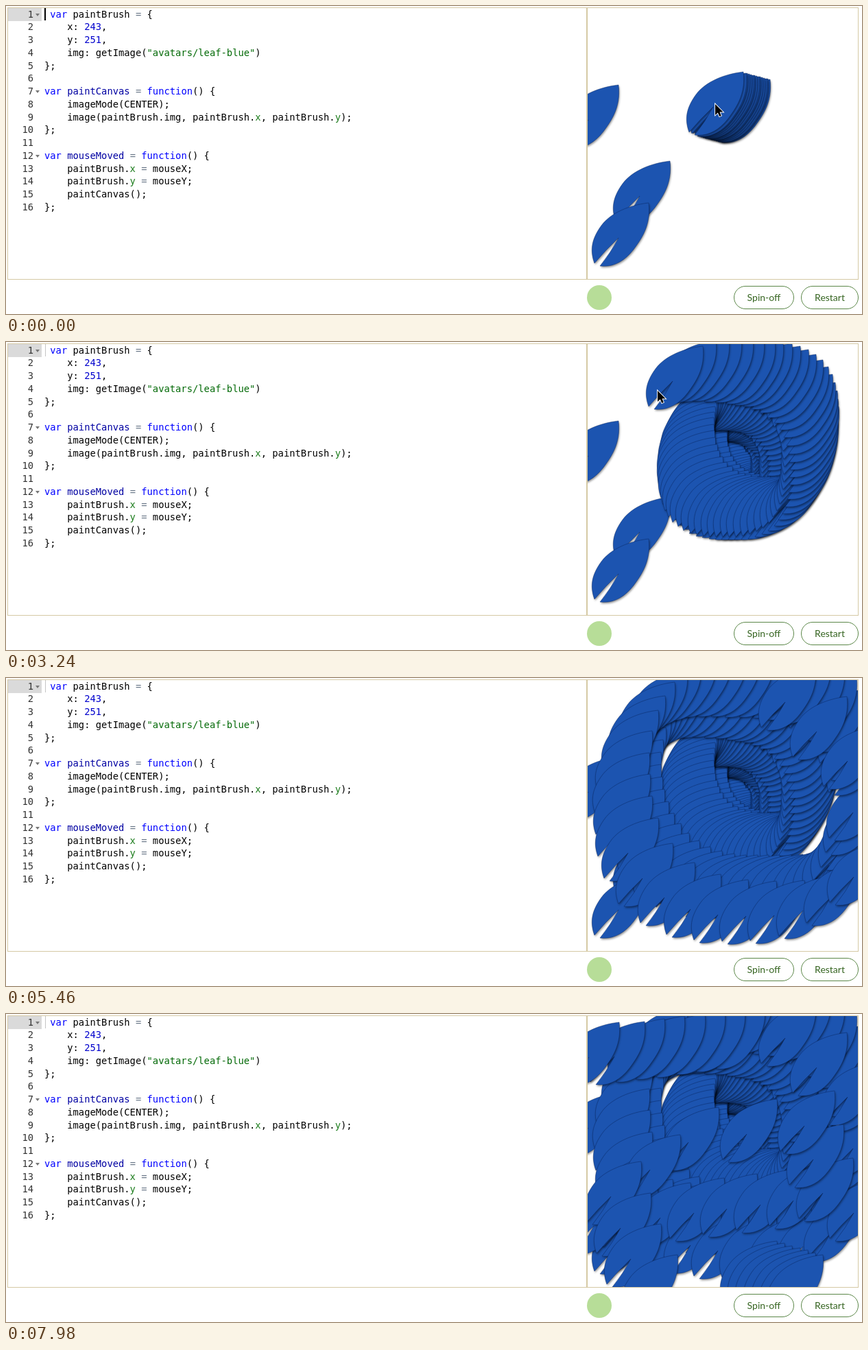
These frames come from a looping animation (1248 px wide and 449 px high, 8580 ms). An HTML page with a canvas:

```html
<!DOCTYPE html>
<html lang="en">
<head>
<meta charset="utf-8">
<title>Leaf painting</title>
<style>
html, body { margin: 0; width: 100%; height: 100%; overflow: hidden; background: #fff; }
#stage { position: relative; width: 1248px; height: 449px; overflow: hidden; }
#stage > * { position: absolute; box-sizing: border-box; }
.panel { top: 2px; height: 397px; border: 1px solid #d5c9a4; }
#editor { left: 2px; width: 845px; }
#output { left: 847px; width: 396px; }
.active { left: 3px; top: 3px; width: 49px; height: 18.5px; background: #dadada; }
pre { margin: 0; top: 2.7px; font: 13.8px/18.73px "DejaVu Sans Mono", monospace; color: #000; }
#numbers { left: 3px; width: 37px; text-align: right; color: #333; }
#code { left: 56px; }
.fold { left: 43px; border: 3px solid transparent; border-top: 4px solid #777; border-bottom: 0; }
#caret { left: 56px; top: 3px; width: 2px; height: 18px; background: #000; }
#caret.dim { left: 57px; width: 1px; background: #c4c4c4; }
.k { color: #00f; }
.d { color: #0000a2; }
.n { color: #0000cd; }
.s { color: #036a07; }
.p { color: #1d7d1d; }
.o { color: #687687; }
.avatar { left: 847px; top: 407px; width: 36px; height: 36px; border-radius: 50%; background: #b7dd98; }
.button { top: 408px; height: 34px; border: 1px solid #5b8748; border-radius: 17px;
  font: 14px/32px Lato, sans-serif; text-align: center; color: #356420; }
#paint { left: 0; top: 0; }
</style>
</head>
<body>
<div id="stage">
  <div class="panel" id="editor"></div>
  <div class="panel" id="output"></div>
  <div class="active"></div>
  <pre id="numbers"></pre>
  <i class="fold" style="top:11px"></i>
  <i class="fold" style="top:123px"></i>
  <i class="fold" style="top:217px"></i>
  <pre id="code"> <span class="k">var</span> paintBrush <span class="o">=</span> {
    x: <span class="n">243</span>,
    y: <span class="n">251</span>,
    img: getImage(<span class="s">"avatars/leaf-blue"</span>)
};

<span class="k">var</span> <span class="d">paintCanvas</span> <span class="o">=</span> <span class="k">function</span>() {
    imageMode(CENTER);
    image(paintBrush.img, paintBrush.<span class="p">x</span>, paintBrush.<span class="p">y</span>);
};

<span class="k">var</span> <span class="d">mouseMoved</span> <span class="o">=</span> <span class="k">function</span>() {
    paintBrush.<span class="p">x</span> <span class="o">=</span> mouseX;
    paintBrush.<span class="p">y</span> <span class="o">=</span> mouseY;
    paintCanvas();
};</pre>
  <div id="caret"></div>
  <div class="avatar"></div>
  <div class="button" style="left:1061px;width:88px">Spin-off</div>
  <div class="button" style="left:1159px;width:84px">Restart</div>
  <canvas id="paint" width="1248" height="449"></canvas>
</div>
<script>
const LOOP = 8580, STEP = 147.6, LAST = 54, SPIRAL_END = 36;
const caret = document.getElementById('caret');
const ctx = document.getElementById('paint').getContext('2d');
document.getElementById('numbers').textContent =
  Array.from({ length: 16 }, (_, i) => i + 1).join('\n');

// Spiral: turns made by a given step, and the radius at every quarter turn from the left.
const pace = [[0, -0.06], [14, 1.87], [22, 2.87], [32, 3.94], [SPIRAL_END, 4.5]];
const radii = [44, 62, 52, 60, 65, 82, 64, 76, 85, 83, 96, 115, 163, 145, 165, 148, 179, 183, 200];

// Hasty strokes after the spiral: [step, x, y].
const strokes = [
  [SPIRAL_END, 1276, 160], [36.8, 1130, 22], [37.3, 1095, -40], [37.5, 1065, 35],
  [39, 890, 58], [40, 780, 60], [42, 860, 305], [44.3, 1195, 262],
  [45, 1167, 159], [46, 998, 183], [47, 885, 262], [48.4, 925, 390],
  [49, 1000, 440], [50, 1083, 378], [53, 1150, 398], [LAST, 1300, 480]
];

// Straight interpolation between keys of the form [time, ...values].
function between(keys, time) {
  const next = Math.max(1, keys.findIndex(key => key[0] >= time));
  const [a, b] = time >= LAST ? keys.slice(-2) : [keys[next - 1], keys[next]];
  const u = Math.min(1, (time - a[0]) / (b[0] - a[0]));
  return a.slice(1).map((v, k) => v + u * (b[k + 1] - v));
}

function radiusAt(turns) {
  const q = Math.max(0, turns * 4), i = Math.floor(q), u = q - i;
  const ease = u * u * (3 - 2 * u);
  const from = radii[i], to = radii[i + 1] ?? from;
  return from + (to - from) * (u + ease) / 2;
}

function mouseAt(time) {
  if (time > SPIRAL_END) return between(strokes, time);
  const [turns] = between(pace, time);
  const angle = turns * 2 * Math.PI;
  const r = radiusAt(turns) * (1 + 0.07 * Math.sin(2 * angle) ** 2);
  return [1076 - r * Math.cos(angle), 160 + r * Math.sin(angle)];
}

const onCanvas = ([x, y]) => x > 848 && x < 1240 && y > 0 && y < 400;

const leaves = [[852, 162], [927, 273], [896, 334]].map(at => ({ time: 0, at }));
for (let k = 0; k < 14; k++) {
  const u = k / 14;
  leaves.push({ time: 0, at: [1073 - 38 * u, 154 - 10 * u] });
}
// Fewer leaves per step as the mouse speeds up.
for (let i = 0; i < LAST; i++) {
  const count = Math.max(2, Math.round(10 - 0.17 * i));
  for (let k = 0; k < count; k++) {
    const time = i + k / count, at = mouseAt(time);
    if (onCanvas(at)) leaves.push({ time, at });
  }
}

const leafShape = new Path2D('M-38 41C-44 24-44 8-28-14C-14-33 14-44 41-47' +
  'C45-14 30 6 19 21C4 40-12 47-30 45Q-14 25-3 4Q-22 22-38 41Z');
const arrow = new Path2D('M0 0V16L3.8 12.6 6.2 18 8.8 16.9 6.5 11.6H11.5Z');

function makeLeaf() {
  const sprite = document.createElement('canvas');
  sprite.width = sprite.height = 116;
  const c = sprite.getContext('2d');
  c.translate(58, 58);
  c.shadowColor = 'rgba(0,0,0,.42)';
  c.shadowBlur = 3;
  c.shadowOffsetX = 1;
  c.shadowOffsetY = 2;
  c.fillStyle = '#1c54b0';
  c.fill(leafShape);
  c.shadowColor = 'transparent';
  c.strokeStyle = 'rgba(8,34,88,.7)';
  c.lineWidth = 0.6;
  c.stroke(leafShape);
  return sprite;
}
const leaf = makeLeaf();

// The pointer runs a little ahead of the paint.
function drawPointer(step) {
  const lead = step === 0 ? 0 : step < 42 ? 0.3 : 0.8;
  const [x, y] = mouseAt(step + lead);
  if (x < 800) return;
  ctx.save();
  ctx.translate(Math.round(x), Math.round(y));
  ctx.lineWidth = 1.8;
  ctx.strokeStyle = '#fff';
  ctx.stroke(arrow);
  ctx.fillStyle = '#000';
  ctx.fill(arrow);
  ctx.restore();
}

function draw(step) {
  ctx.clearRect(0, 0, 1248, 449);
  ctx.save();
  ctx.beginPath();
  ctx.rect(848, 3, 394, 395);
  ctx.clip();
  for (const { time, at: [x, y] } of leaves) {
    if (time <= step) ctx.drawImage(leaf, Math.round(x) - 58, Math.round(y) - 58);
  }
  ctx.restore();
  drawPointer(step);
  caret.className = step > 0 ? 'dim' : '';
}

let shown = -1;
const start = performance.now();
function tick() {
  const time = (performance.now() - start) % LOOP;
  const step = Math.min(LAST, Math.floor((time + 9) / STEP));
  if (step !== shown) draw(shown = step);
  requestAnimationFrame(tick);
}
tick();
</script>
</body>
</html>
```
